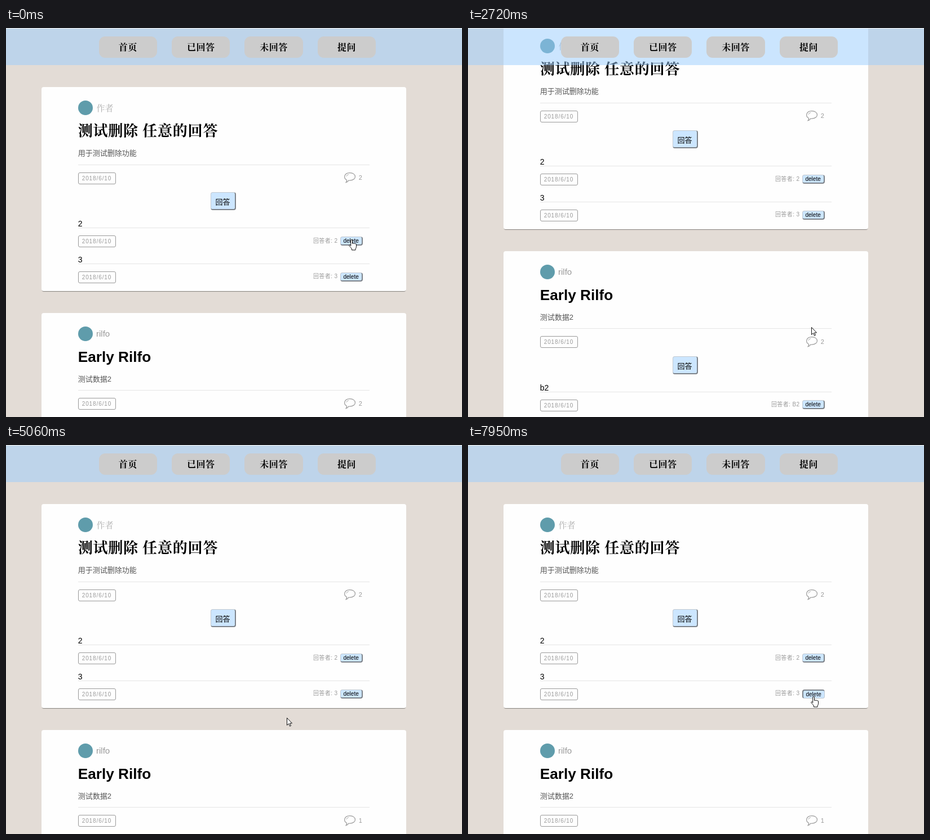
An HTML page for the animation above (8000 ms loop, 809 by 692 pixels).

```html
<!DOCTYPE html>
<html lang="zh">
<head>
<meta charset="utf-8">
<style>
html, body { margin: 0; width: 100%; height: 100%; overflow: hidden; background: #e3dcd6; }
body { position: relative; font-family: "Liberation Sans", "Noto Sans CJK SC", "Noto Sans CJK", sans-serif; }
body *, svg { position: absolute; box-sizing: border-box; }
svg * { position: static; }
#page { left: 0; top: 0; width: 809px; height: 900px; }
.card { width: 647px; background: #fefefe; border-radius: 4px; box-shadow: 0 2px 1px -1px rgba(0, 0, 0, .42); }
.text { line-height: 20px; white-space: pre; }
.serif { font-family: "Liberation Serif", "Noto Serif CJK SC", "Noto Sans CJK SC", "Noto Sans CJK", serif; }
.avatar { left: 64.7px; top: 24px; width: 26px; height: 26px; border-radius: 50%; background: #5f9cab; }
.rule { left: 64.7px; width: 517.6px; height: 1px; background: #e5e5e5; }
.date { left: 64.7px; width: 67px; height: 21px; border: 1px solid #999; border-radius: 3px;
  font-size: 10px; line-height: 19px; letter-spacing: .9px; padding-left: 6px; color: #999; white-space: pre; }
.btn { background: #cce6ff; border: solid; border-width: 1px 2px 2px 1px; border-color: #c3cad1 #7d838a #7d838a #c3cad1;
  border-radius: 4px; text-align: center; color: #000; white-space: pre; }
.reply { left: 299.5px; top: 187.3px; width: 45px; height: 32px; font-size: 13px; line-height: 33px; }
.delete { left: 529.6px; width: 40px; height: 16px; font-size: 10px; line-height: 14px; }
.down { border-width: 2px 1px 1px 2px; border-color: #7d838a #c3cad1 #c3cad1 #7d838a; }
#nav { left: 0; top: 1px; width: 100%; height: 65px; background: rgba(153, 206, 255, .5); }
#nav div { top: 14px; width: 103.5px; height: 38px; border-radius: 11px; background: #ccc;
  font-weight: 700; font-size: 16px; line-height: 39px; letter-spacing: .5px; text-align: center; }
#edge { left: 0; top: 0; width: 100%; height: 1px; background: #f4f3f2; }
#cursor { left: 0; top: 0; width: 20px; height: 24px; overflow: visible; }
</style>
</head>
<body>
<div id="page"></div>
<div id="nav" class="serif"></div>
<div id="edge"></div>
<svg id="cursor"><path fill="#fff" stroke="#111" stroke-linejoin="round"/></svg>
<script>
const LOOP = 8000, DATE = '2018/6/10';
const REMOVED = 3820, CLOSED = 5590, OPENED = 7030, PRESSED = 7950;
const GAP = 38.4, ROW = 63.8, BASE = 235.6;

const ARROW = 'M.5 .5v13l3-2.8 2 4.6 2-.9-2-4.4h4z';
const HAND = 'M3.7 11.5V2a1.4 1.4 0 0 1 2.8 0v5.5q1.2-1.2 2.5 0q1.2-1 2.4.3q1.8-.6 2.1 1v4.4' +
  'q-.2 2-1.5 3.8v2H5.5v-2Q4 14.6 1 11.6q-.6-1.6.8-1.9q1 .3 1.9 1.8z';
const BUBBLE = '<svg style="left:536px;top:151px" width="24" height="22" fill="none" stroke="#999" stroke-width="1.2">' +
  '<path d="M5.6 14.6C-.6 11.2 .4 1.8 11 1.6c12 0 13 13 .5 13.6q-1.5.1-2.6-.1Q7.6 18 4.2 18.6Q5.8 16.8 5.6 14.6z"/>' +
  '<path d="M5 8q.5-3 4-3.6" stroke-width=".8"/></svg>';

// [time, scroll offset], held until the next entry
const scrolls = [[0, 0], [1240, 23.5], [1377, 58.4], [2600, 110], [2730, 160], [2870, 186],
  [REMOVED, 122.2], [4480, 92.3], [4630, 0]];

// [first step, last step, number of steps, x, y]
const moves = [
  [840, 840, 1, 611, 384],
  [1377, 2200, 7, 609, 530],
  [2330, 2330, 1, 609, 532],
  [2870, 3420, 5, 621, 656],
  [3560, 3690, 2, 616, 592],
  [3950, 4080, 2, 506, 506],
  [4480, 4480, 1, 498, 489],
  [4910, 5060, 2, 498, 485],
  [5960, 6890, 8, 636, 258],
  [7170, 7800, 5, 613, 447]
];
const handTimes = [[0, 1500], [3280, 3950], [6750, 7170], [7640, LOOP]];

const $ = id => document.getElementById(id);
const page = $('page'), cursor = $('cursor'), shape = cursor.firstChild;

const text = (str, x, cy, size, color, extra = '', cls = '') =>
  `<div class="text ${cls}" style="left:${x}px;top:${cy - 10}px;font-size:${size}px;color:${color};${extra}">${str}</div>`;
const box = (cls, top, str = '') => `<div class="${cls}" style="top:${top}px">${str}</div>`;

function answer([body, who], i, down) {
  const y = BASE + i * ROW;
  return text(body, 64.7, y + 7.7, 14, '#000') +
    box('rule', y + 14.6) +
    box('date', y + 28.4, DATE) +
    text(`回答者: ${who}`, 'auto;right:121.5', y + 38, 10, '#999', 'letter-spacing:.4px') +
    box('btn delete' + (down ? ' down' : ''), y + 30.2, 'delete');
}

function card(x, y, post, answers, count, pressed) {
  const height = BASE + answers.length * ROW;
  return `<div class="card" style="left:${x}px;top:${y}px;height:${height}px"><div class="avatar"></div>` +
    post.head +
    text(post.desc, 64.7, 118, 13, '#555') +
    box('rule', 137.8) +
    box('date', 151.6, DATE) +
    BUBBLE +
    text(count, 562.8, 161, 11, '#999') +
    '<div class="btn reply">回答</div>' +
    answers.map((a, i) => answer(a, i, pressed && i === answers.length - 1)).join('') +
    '</div>';
}

const first = {
  head: text('作者', 97.5, 37.5, 15, '#aaa', '', 'serif') +
    text('测试删除 任意的回答', 64.7, 79, 26, '#000', 'font-weight:600;letter-spacing:.8px', 'serif'),
  desc: '用于测试删除功能'
};
const second = {
  head: text('rilfo', 97, 37.5, 15, '#999') +
    text('Early Rilfo', 64.7, 78.4, 26.2, '#000', 'font-weight:700'),
  desc: '测试数据2'
};
const firstAnswers = [['2', '2'], ['3', '3']];
const secondAnswers = [['b2', 'B2'], ['b1', 'B1']];

function cards(t) {
  const closed = t >= CLOSED && t < OPENED;
  const x = closed ? 70.4 : 63;
  const a = closed ? [] : firstAnswers;
  const b = t >= CLOSED ? [] : secondAnswers.slice(t >= REMOVED ? 1 : 0);
  return card(x, 105, first, a, 2, t >= PRESSED) +
    card(x, 105 + BASE + a.length * ROW + GAP, second, b, t < REMOVED ? 2 : 1);
}

function pointer(t) {
  let x = 613, y = 376;
  for (const [t0, t1, n, tx, ty] of moves) {
    if (t < t0) break;
    const gap = (t1 - t0) / (n - 1) || 1;
    const p = Math.min(n, Math.floor((t - t0) / gap + 1e-6) + 1) / n;
    x += (tx - x) * p;
    y += (ty - y) * p;
  }
  return [Math.round(x), Math.round(y)];
}

let shown = '';
function draw(t) {
  const html = cards(t);
  if (html !== shown) page.innerHTML = shown = html;
  page.style.top = -scrolls.filter(s => s[0] <= t).pop()[1] + 'px';

  const hand = handTimes.some(([from, to]) => t >= from && t < to);
  const [x, y] = pointer(t);
  shape.setAttribute('d', hand ? HAND : ARROW);
  cursor.style.transform = `translate(${x - (hand ? 5 : 0)}px, ${y}px)`;
}

$('nav').innerHTML = ['首页', '已回答', '未回答', '提问']
  .map((label, i) => `<div style="left:${164.5 + i * 129.4}px">${label}</div>`).join('');

const start = performance.now();
function tick() {
  draw((performance.now() - start) % LOOP);
  requestAnimationFrame(tick);
}
tick();
</script>
</body>
</html>
```
